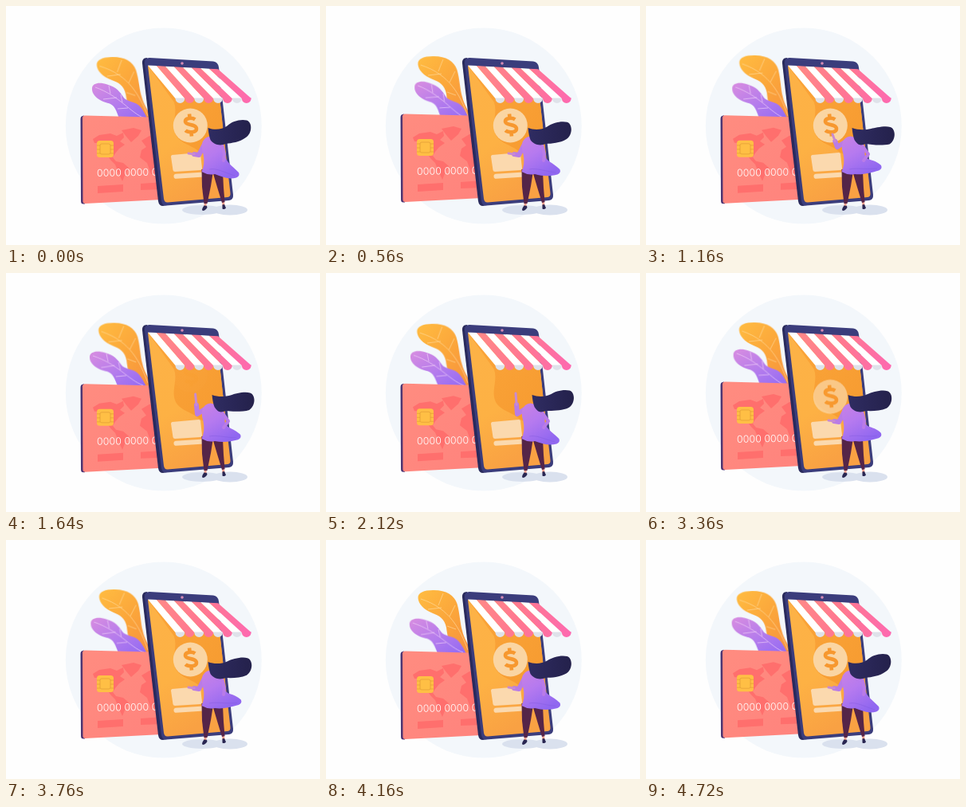
Recreate the animation shown at these times as an HTML page. Size 394x300 px, loop 4.76 s.

```html
<!DOCTYPE html>
<html lang="en">
<head>
<meta charset="utf-8">
<title>Mobile shop</title>
<style>
  html, body { margin: 0; width: 100%; height: 100%; overflow: hidden; background: #fefefe; }
  svg { display: block; width: 394px; height: 300px; }
  .sway { animation: 1190ms cubic-bezier(.37, 0, .63, 1) infinite alternate; }
  #card { animation-name: bob; animation-delay: -595ms; }
  #violet { animation-name: lean; animation-delay: -595ms; transform-origin: 175px 140px; }
  #amber { animation-name: rock; transform-origin: 178px 140px; }
  #coin { animation: scroll 4760ms ease-in-out infinite; }
  @keyframes bob { from { transform: translateY(2px); } to { transform: translateY(-2px); } }
  @keyframes lean {
    from { transform: translateX(-2px) rotate(-1.9deg); }
    to { transform: translateX(2px) rotate(1.9deg); }
  }
  @keyframes rock { from { transform: rotate(-1.4deg); } to { transform: rotate(1.4deg); } }
  @keyframes scroll {
    0%, 25.2% { transform: none; opacity: 1; }
    35.7% { transform: translateY(-22px); opacity: 0; }
    35.8%, 60.9% { transform: translateY(22px); opacity: 0; }
    75.6%, 100% { transform: none; opacity: 1; }
  }
</style>
</head>
<body>
<svg viewBox="0 0 394 300">
  <defs>
    <linearGradient id="gAmber" x1="0" y1="0" x2="1" y2="1">
      <stop offset="0" stop-color="#ffbc41"/><stop offset=".5" stop-color="#fba63b"/><stop offset="1" stop-color="#f68f3e"/>
    </linearGradient>
    <linearGradient id="gViolet" x1="0" y1="0" x2="1" y2="1">
      <stop offset="0" stop-color="#d88de0"/><stop offset=".5" stop-color="#b57cec"/><stop offset="1" stop-color="#9069f4"/>
    </linearGradient>
    <linearGradient id="gCard" x1="0" y1="0" x2="1" y2="1">
      <stop offset="0" stop-color="#ff8c80"/><stop offset="1" stop-color="#ff837d"/>
    </linearGradient>
    <linearGradient id="gScreen" x1="0" y1="0" x2=".4" y2="1">
      <stop offset="0" stop-color="#fdb247"/><stop offset=".6" stop-color="#fdb144"/><stop offset="1" stop-color="#f9a143"/>
    </linearGradient>
    <linearGradient id="gBlob" x1="0" y1="0" x2="1" y2="1">
      <stop offset="0" stop-color="#fba63a"/><stop offset="1" stop-color="#f69a30"/>
    </linearGradient>
    <linearGradient id="gStripe" gradientUnits="userSpaceOnUse" x1="185" y1="75" x2="308" y2="118">
      <stop offset="0" stop-color="#ff8a86"/><stop offset=".5" stop-color="#ff7792"/><stop offset="1" stop-color="#fd69b0"/>
    </linearGradient>
    <linearGradient id="gDress" x1="0" y1="0" x2=".6" y2="1">
      <stop offset="0" stop-color="#c982e3"/><stop offset=".45" stop-color="#b67aef"/><stop offset="1" stop-color="#9067f0"/>
    </linearGradient>
    <linearGradient id="gHair" x1="0" y1="0" x2="1" y2="0">
      <stop offset="0" stop-color="#2f2c62"/><stop offset="1" stop-color="#24214b"/>
    </linearGradient>
  </defs>

  <circle cx="197.800" cy="150.500" r="123" fill="#f3f7fb"/>

  <g id="amber" class="sway">
    <path fill="url(#gAmber)" d="M160 142C154 130 152 118 151 110C149 99 142 95 134 92C122 87 116 80 115.500 73C115 66 123 63 134 63C150 62.500 161 69 164.500 80C168 92 168 104 171 114C173 123 178 130 183 142Z"/>
    <path fill="none" stroke="#ffe0a8" stroke-width=".6" d="M178 138C168 112 156 86 119 74M141 82L147 67M155 96L162 82M145 85L128 87M163 112L152 108"/>
  </g>
  <g id="violet" class="sway">
    <path fill="url(#gViolet)" d="M143 143C140 137 139 131 135 126C131 121 124 122 118 118C111 114 107.500 109 108 103C108.500 97 117 95 127 98.500C139 102 143 108 147 114C151 121 163 119 169 127Q173 132 178 143Z"/>
    <path fill="none" stroke="#f0cdf7" stroke-width=".7" d="M174 141C156 134 143 113 112 102M131 110L129 100M146 121L144 111M139 115L122 117M153 128L140 129"/>
  </g>

  <g id="card" class="sway">
    <path fill="#4c3472" d="M98 137.500L96 138Q93.500 138.500 93.500 142L94 245Q94 248.500 97 248.500H99Z"/>
    <path fill="url(#gCard)" d="M99.500 137.500L198 140L205 242.500L99.500 248Q96.500 248 96.500 245L96 140.500Q96 137.500 99.500 137.500Z"/>
    <g fill="#ff6f6d">
      <path d="M109 167L117 162L131 160L139 163L147 159L148 165L143 170L149 174L142 179L137 185L134 190L138 195L147 197L154 203L150 210L146 220L141 209L137 199L131 193L127 187L121 181L119 172L111 172Z"/>
      <path d="M145 156L160 153L170 156L166 163L157 171L151 164Z"/>
      <path d="M170 169L180 163L192 165L192 209L182 211L177 197L168 190L170 181L176 177Z"/>
      <path d="M115 226L147 224V233L115 235ZM169 223L198 221V230L169 231Z"/>
    </g>
    <rect x="114" y="169" width="21" height="21" rx="3.500" fill="#ffbf45"/>
    <path fill="none" stroke="#e09a36" stroke-width=".7" d="M114 175H118M114 180H118M114 185H118M131 175H135M131 180H135M131 185H135M120 173H129Q131 173 131 175V184Q131 186 129 186H120Q118 186 118 184V175Q118 173 120 173Z"/>
    <text x="114" y="214" transform="rotate(-1 114 214)" fill="#fff" font-family="Inter, sans-serif" font-size="12.500" font-weight="300">0000 0000 0000</text>
  </g>

  <path fill="#292a5c" d="M177 65L174 65.500Q170.500 67 171 72L191 245Q192 251 197 251L202 250Z"/>
  <path fill="#3b3d7c" d="M180 65L260 69.500Q266 70 267 77L285 237Q285.500 243 280 244L201 250.500Q196 251 195 245L174 72Q173.500 65 180 65Z"/>
  <path fill="url(#gScreen)" d="M178 75L264 80L281.500 235Q282 239.500 278 240L203 246.500Q199 247 198 242Z"/>
  <path fill="url(#gBlob)" d="M178 75L211 121C215 134 209 144 211 156C214 172 232 174 240 181C251 190 262 189 276 190L265 86Z"/>
  <circle cx="221" cy="72" r="1.800" fill="#d68bb5"/>

  <path fill="#fbd9ae" d="M208.500 187L242 184Q243.500 184 244 185.500L246 203.500Q246 205.500 244 206L212 208Q210 208 209.500 206L207 189Q207 187.500 208.500 187Z"/>
  <path stroke="#fbd9ae" stroke-width="6" stroke-linecap="round" d="M213.500 213.700L248 211.500"/>
  <g id="coin">
    <circle cx="231.300" cy="150" r="21.500" fill="#fad5a3"/>
    <path transform="translate(231.500 149.500) rotate(-6)" fill="none" stroke="#f7982f" stroke-width="4.600"
      d="M6.500 -6.500C3 -9.500 -6 -10 -6 -5C-6 0 7 -1 7 5C7 10.500 -4 9.500 -7 6M0 -14V-8M0 8V14"/>
  </g>

  <g id="awning"></g>

  <g fill="#dae1ee">
    <ellipse cx="246" cy="256" rx="25" ry="6"/>
    <ellipse cx="281" cy="256" rx="22" ry="6.500"/>
  </g>
  <path stroke="#eda08f" stroke-width="3" d="M250.300 246L250 252M272.500 245L273 251"/>
  <g fill="#552548">
    <path d="M245.500 205L260 207L257 226L252.500 248H248.500L246 227Z"/>
    <path d="M259 207L272 208L273 228L274.500 246L271 247L265.500 229Z"/>
  </g>
  <path fill="#2a2752" d="M248.500 250.500L252 251L252.500 253Q250 257 247 257Q244.500 256 248.500 250.500ZM271.500 249.500L274 249L276 253.500Q274 256 271.500 254.500Z"/>
  <path id="sleeve" fill="none" stroke="#b97ce6" stroke-width="6" stroke-linecap="round" stroke-linejoin="round"/>
  <path id="hand" fill="none" stroke="#c98bd0" stroke-width="3" stroke-linecap="round"/>
  <path id="dress" fill="url(#gDress)"/>
  <path id="elbow" fill="none" stroke="#b97be8" stroke-width="4" stroke-linecap="round" stroke-linejoin="round"/>
  <path id="fold" fill="none" stroke="#8059dc" stroke-width=".8" opacity=".5"/>
  <path id="hair" fill="url(#gHair)"/>
</svg>
<script>
  const LOOP = 4760, SWAY = LOOP / 2;
  const el = id => document.getElementById(id);
  const put = (id, d) => el(id).setAttribute('d', d);
  const ease = p => { p = Math.min(1, Math.max(0, p)); return p * p * (3 - 2 * p); };

  // Awning: eight slanted stripes, each ending in a scallop
  const topAt = i => `${178 + i * 11} ${74.5 + i * .6}`;
  el('awning').innerHTML = Array.from({ length: 8 }, (_, i) => {
    const x = 212.5 + i * 11.9, end = x + 11.9, pink = i % 2;
    return `<path fill="${pink ? 'url(#gStripe)' : '#fff'}" d="M${topAt(i)}L${topAt(i + 1)}L${end} 116H${x}Z"/>
      <path fill="${pink ? 'url(#gStripe)' : '#dfe2ea'}" d="M${x} 115.500H${end}C${end} 124 ${x} 124 ${x} 115.500Z"/>`;
  }).join('');

  // Hand stops: time, x, y
  const stops = [[0, 229, 185], [640, 229, 185], [1160, 234, 161], [1760, 238, 151],
    [2400, 238, 151], [2840, 229, 162], [3280, 229, 185], [LOOP, 229, 185]];

  function handAt(t) {
    const i = stops.findIndex(s => s[0] > t), a = stops[i - 1], b = stops[i];
    const p = ease((t - a[0]) / (b[0] - a[0]));
    return [a[1] + (b[1] - a[1]) * p, a[2] + (b[2] - a[2]) * p];
  }

  function draw(t) {
    const c = Math.cos(2 * Math.PI * t / SWAY);
    const up = ease((t - 640) / 480) * (1 - ease((t - 2400) / 880));

    const h = 253.5 + 5 * up, u = (1 - c) / 2 + 3.5 * up, v = 2.5 * (1 - c) + 3.5 * up;
    put('hair', `M${h} 153C${h + 8} 156 ${h + 17} 155.500 ${h + 24} ${150.5 + v * .4}
      C${283 + u} ${144.5 + v} ${295 + u} ${141.5 + v} ${302 + u} ${143.5 + v}
      C${309.5 + u} ${146 + v} ${309 + u} ${160 + v} ${301 + u} ${165 + v}
      C${293 + u} ${171 + v * .5} 283 ${172 + v * .3} 276 173C268 176 ${h + 7} 174 ${h + 3} 168Q${h + 1} 163 ${h} 153Z`);

    const e = 4.5 * (c - 1), x = 292 + 1.5 * (1 - c), y = 212 + e;
    put('dress', `M250 166Q256 161 264 166L271 172Q275.500 177 274.500 186C275 195 ${x - 9} ${y - 12} ${x} ${y - 3}
      Q${x + 2} ${y + 1} ${x - 3} ${y + 3.5}C${x - 12} ${y + 6} 272 ${215 + e * .3} 262 211
      Q254 213 245.500 208Q250 198 247.500 186Q243 172 250 166Z`);
    put('fold', `M255 205C264 203 274 ${209 + e * .4} ${x - 5} ${y + 1}`);
    put('elbow', `M271 175L${274 + 5 * up} 186L273 194`);

    const [hx, hy] = handAt(t);
    const ex = 242 - 2 * up, ey = 187 - 10 * up;
    const mx = ex + (hx - ex) * .45, my = ey + (hy - ey) * .45;
    put('sleeve', `M251 170L${ex} ${ey}L${mx} ${my}`);
    put('hand', `M${mx} ${my}L${hx} ${hy}`);
  }

  function tick() {
    const clock = document.timeline.currentTime ?? performance.now();
    const started = el('card').getAnimations()[0]?.startTime ?? 0;
    draw(Math.max(0, clock - started) % LOOP);
    requestAnimationFrame(tick);
  }
  draw(0);
  requestAnimationFrame(tick);
</script>
</body>
</html>
```
